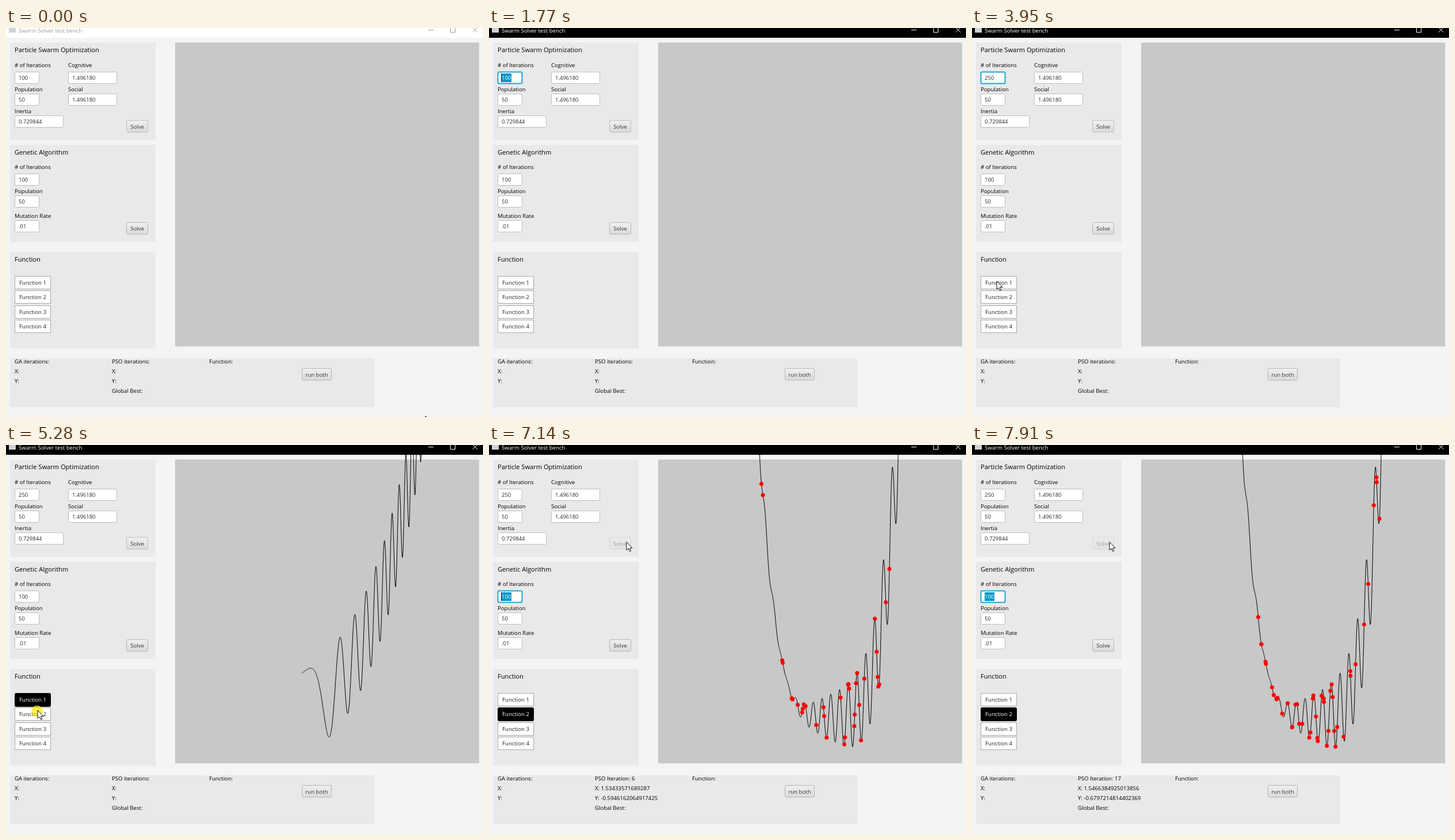
An HTML page for the animation above (8000 ms loop, 829 px wide and 676 px high).

```html
<!DOCTYPE html>
<html lang="en">
<head>
<meta charset="utf-8">
<title>Swarm Solver test bench</title>
<style>
  html, body { margin: 0; width: 100%; height: 100%; overflow: hidden; background: #f4f4f4; }
  svg { display: block; width: 829px; height: 676px; }
  text { font: 9.6px "Open Sans", "Noto Sans", sans-serif; white-space: pre; }
  .head { font-size: 11.1px; }
  .value { font-size: 9.5px; fill: #2a2a2a; }
  .panel { fill: #e9e9e9; }
</style>
</head>
<body>
<svg id="stage" viewBox="0 0 829 676">
  <defs>
    <clipPath id="below"><rect y="17" width="829" height="659"/></clipPath>
    <linearGradient id="shade" x2="0" y2="1">
      <stop stop-color="#f0f0f0"/><stop offset="1" stop-color="#dadada"/>
    </linearGradient>
  </defs>
</svg>
<script>
const LOOP = 8000, BLINK = 470;
const X0 = 514.2, Y0 = 472.6, UNIT = 76;

// Moments of the session
const SELECT = 1290, TYPE = 2190, TYPED = 2420, PICK = 4740, REPICK = 5350;
const SOLVE = 6600, STARTED = 6670, FIRST_STEP = 6790, STEP = 70;

const stage = document.getElementById('stage');

function set(node, attrs) {
  for (const key in attrs) node.setAttribute(key, attrs[key]);
  return node;
}
function add(tag, attrs, parent = stage) {
  const node = set(document.createElementNS('http://www.w3.org/2000/svg', tag), attrs);
  return parent.appendChild(node);
}
const rect = (x, y, width, height, attrs, parent) => add('rect', { x, y, width, height, ...attrs }, parent);
function label(x, y, content, attrs, parent) {
  const node = add('text', { x, y, ...attrs }, parent);
  node.textContent = content;
  return node;
}
const show = (node, on) => set(node, { visibility: on ? 'visible' : 'hidden' });
function write(node, content) {
  if (node.textContent !== content) node.textContent = content;
}
const outline = focused => ({ stroke: focused ? '#1fa5d6' : '#bdbdbd', 'stroke-width': focused ? 2 : 1 });

// A captioned text field; returns a function that updates its state
function entry(x, y, name, value, w = 43, gap = 4.5) {
  label(x, y - gap, name);
  const box = rect(x + .5, y + .5, w - 1, 20, { rx: 2, fill: '#fff', ...outline(false) });
  const mark = rect(x + 7, y + 3, 17, 15, { fill: '#0096c9', visibility: 'hidden' });
  const text = label(x + 7, y + 14, value, { class: 'value' });
  const caret = rect(x + 6, y + 3, 1, 15, { fill: '#222', visibility: 'hidden' });
  return (content, focused, selected, age) => {
    write(text, content);
    text.style.fill = selected ? '#fff' : '';
    set(box, outline(focused));
    show(mark, selected);
    const lit = Math.floor(age / BLINK) % 2 === (selected ? 1 : 0);
    show(caret, focused && lit);
    set(caret, { x: x + 6 + (selected ? 0 : 5.6 * content.length) });
  };
}
function button(x, y, w, content) {
  const group = add('g', {});
  const box = rect(x + .5, y + .5, w - 1, 20.5, { rx: 2.5, fill: 'url(#shade)', stroke: '#b4b4b4' }, group);
  label(x + w / 2, y + 14.5, content, { 'text-anchor': 'middle', fill: '#333' }, group);
  return { group, box };
}
function panel(y, w, h, title) {
  rect(7, y, w, h, { class: 'panel' });
  label(15, y + 16.6, title, { class: 'head' });
}

// Title bar
const bar = rect(0, 0, 829, 17, {});
rect(5, -3, 12, 11, { fill: '#ccd2d6' });
const caption = label(22, 7.6, 'Swarm Solver test bench');
const controls = add('path', { d: 'M734 3.5H743M772.5 -1V7.5H780.5V-1M811 -1L819.5 7.5M819.5 -1L811 7.5', fill: 'none' });

// Settings
rect(294, 25.3, 528.3, 528, { fill: '#c8c8c8' });
panel(25.4, 253, 169, 'Particle Swarm Optimization');
const swarmField = entry(15, 76, '# of Iterations', '100', 43, 8.5);
entry(108, 76, 'Cognitive', '1.496180', 85, 8.5);
entry(15, 114, 'Population', '50');
entry(108, 114, 'Social', '1.496180', 85);
entry(15, 152, 'Inertia', '0.729844', 85);
const solve = button(209, 160, 38, 'Solve');

panel(203, 253, 169, 'Genetic Algorithm');
const geneField = entry(15, 253, '# of Iterations', '100', 43, 8.5);
entry(15, 291, 'Population', '50');
entry(15, 334, 'Mutation Rate', '.01');
button(209, 337.5, 38, 'Solve');

panel(389, 253, 168, 'Function');
const choices = [1, 2, 3, 4].map(i => {
  const y = Math.round(431 + (i - 1) * 25.3);
  const box = rect(15.5, y + .5, 62, 22, {});
  const text = label(46.5, y + 15, 'Function ' + i, { 'text-anchor': 'middle' });
  return { box, text };
});

// Results
panel(574, 633, 85, '');
const column = (x, names) => names.map((name, i) => label(x, 583 + 16.9 * i, name));
column(15, ['GA iterations:', 'X:', 'Y:']);
const [psoCount, psoX, psoY] = column(184, ['', '', '', 'Global Best:']);
column(353, ['Function:']);
button(514, 591, 52, 'run both');

// Test functions and their curves
const chirp = x => Math.cos(9 * x * x - .57 * (1 - Math.exp(-4 * x * x)))
  + .757 * x + .01 * x * x + .234 * x ** 3;
const ripple = x => Math.sin(10 * Math.PI * x) / 2 * x + Math.pow(x - 1, 4);
const toX = x => X0 + x * UNIT;
const toY = y => Y0 - y * UNIT;

const plot = add('g', { 'clip-path': 'url(#below)' });
function curve(f, from, to) {
  const points = [];
  for (let x = from; x <= to; x += .003)
    points.push(toX(x).toFixed(2) + ',' + toY(f(x)).toFixed(2));
  return add('polyline', { points: points.join(' '), fill: 'none', stroke: '#000' }, plot);
}
const curves = [curve(chirp, 0, 2.9), curve(ripple, -.8, 2.75)];

// Each particle swings around the best valley with a slowly shrinking reach
function random(seed) {
  const s = Math.sin(seed * 127.1) * 43758.5453;
  return s - Math.floor(s);
}
const dots = Array.from({ length: 50 }, (_, i) => ({
  node: add('circle', { r: 3.5, fill: '#f00' }, plot),
  reach: 1 + 3 * random(i + 1),
  phase: 2 * Math.PI * random(i + 101),
  speed: .4 + .8 * random(i + 201)
}));
function placeDots(n) {
  for (const { node, reach, phase, speed } of dots) {
    const x = 1.45 + reach * .96 ** n * Math.cos(phase + speed * n);
    set(node, { cx: toX(x), cy: toY(ripple(x)) });
  }
}

// Pointer: key points of its path, the times it is visible, and its clicks
const halo = add('circle', { r: 10, fill: '#f5e900' });
const pointer = add('path', { d: 'M0 0V14.2L3.3 11.3 5.5 16.4 7.7 15.4 5.5 10.5H10Z', fill: '#fff', stroke: '#111' });
const route = [
  [65, 729, 674], [219, 45, 253], [540, 60, 91], [1080, 45, 86], [2880, 80, 95],
  [3300, 100, 350], [3750, 68, 491], [3950, 43, 440], [PICK, 43, 440],
  [5130, 55, 461], [REPICK, 55, 461], [6050, 239, 168.5]
];
const visible = [[0, 219], [540, 619], [770, 925], [2880, LOOP]];
const clicks = [1080, 4670, 5280, SOLVE];
const FADE = 280;

function pointerAt(t) {
  const next = route.findIndex(stop => stop[0] > t);
  if (next < 1) return route[next ? route.length - 1 : 0].slice(1);
  const [ta, xa, ya] = route[next - 1], [tb, xb, yb] = route[next];
  const k = (t - ta) / (tb - ta);
  return [xa + (xb - xa) * k, ya + (yb - ya) * k];
}
function movePointer(t) {
  const [x, y] = pointerAt(t);
  show(set(pointer, { transform: `translate(${x} ${y})` }), visible.some(([a, b]) => t >= a && t < b));
  const click = clicks.find(c => t >= c && t < c + FADE);
  show(halo, click);
  if (click) set(halo, { cx: x - 1, cy: y + 1.5, opacity: .7 * (1 - (t - click) / FADE) });
}

function drawForms(t) {
  const active = t >= clicks[0];
  set(bar, { fill: active ? '#000' : '#fff' });
  set(caption, { fill: active ? '#fff' : '#999' });
  set(controls, { stroke: active ? '#fff' : '#999' });

  const typing = t >= TYPE;
  const typed = '250'.slice(0, t < TYPED ? 2 : 3);
  const lastEdit = t >= TYPED ? TYPED : typing ? TYPE : SELECT;
  swarmField(typing ? typed : '100', active && t < PICK, t >= SELECT && !typing, t - lastEdit);

  const started = t >= STARTED;
  geneField('100', started, started, t - STARTED);
  const pressed = t >= SOLVE && !started;
  set(solve.box, { ...outline(pressed), fill: pressed ? '#d4d4d4' : 'url(#shade)' });
  set(solve.group, { opacity: started ? .4 : 1 });

  const chosen = t < PICK ? -1 : t < REPICK ? 0 : 1;
  choices.forEach(({ box, text }, i) => {
    const on = i === chosen;
    set(box, { fill: on ? '#000' : '#fff', stroke: on ? '#000' : '#a9a9a9', rx: on ? 2 : 0, height: on ? 23 : 22 });
    set(text, { fill: on ? '#fff' : '#222' });
  });
  curves.forEach((line, i) => show(line, i === chosen));
}

function drawSwarm(t) {
  const n = Math.min(17, 1 + Math.floor((t - FIRST_STEP) / STEP));
  const running = n >= 1;
  dots.forEach(dot => show(dot.node, running));
  if (running) placeDots(n);
  const best = n < 12 ? 1.53433571689287 : 1.5466384925013856;
  write(psoCount, running ? 'PSO Iteration: ' + n : 'PSO iterations:');
  write(psoX, running ? 'X: ' + best : 'X:');
  write(psoY, running ? 'Y: ' + ripple(best) : 'Y:');
}

const start = performance.now();
function frame() {
  const t = (performance.now() - start) % LOOP;
  drawForms(t);
  drawSwarm(t);
  movePointer(t);
  requestAnimationFrame(frame);
}
frame();
</script>
</body>
</html>
```
